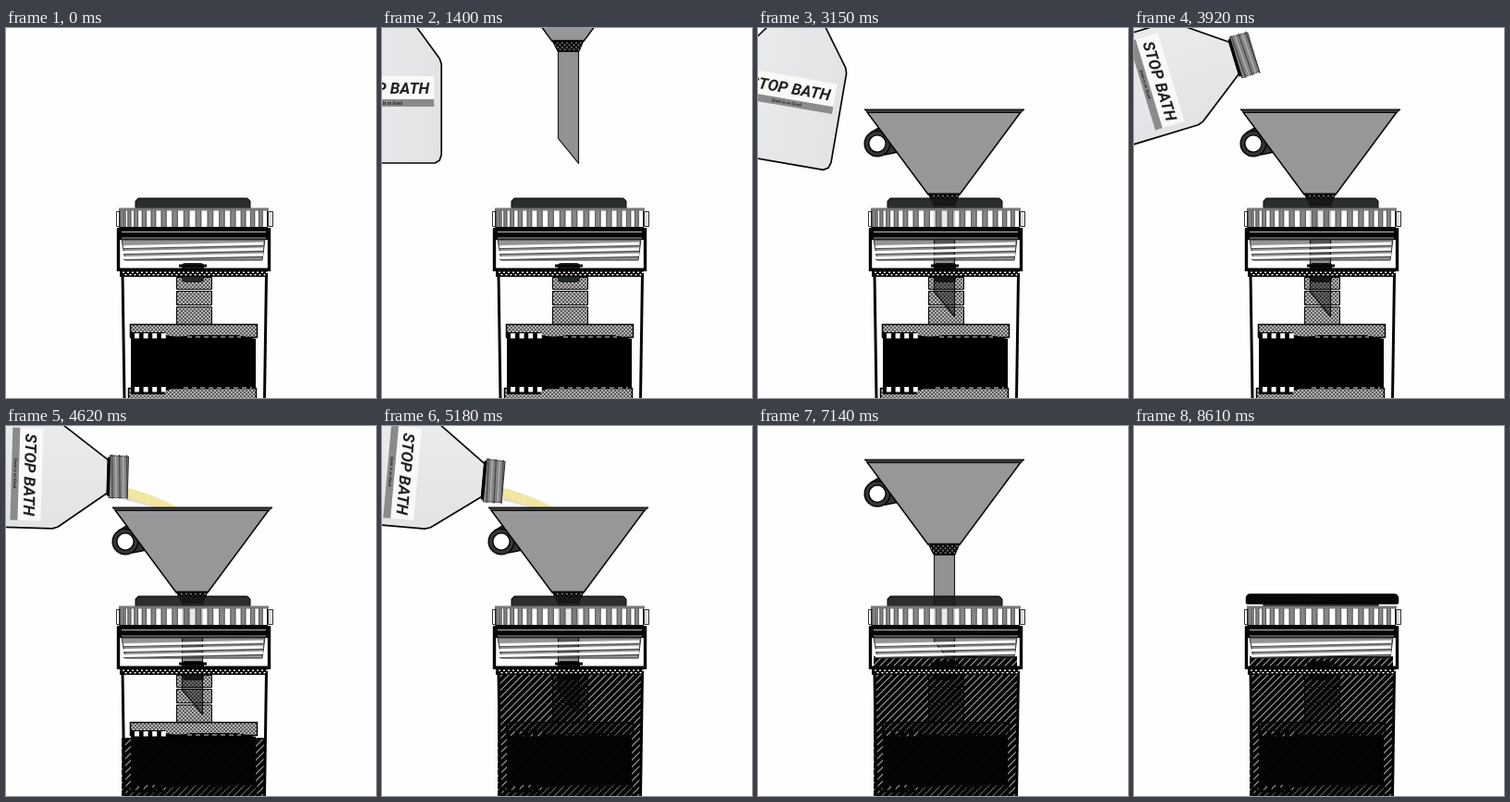
Write an HTML page with a canvas that moves like this. It is 400x400 px and loops after 8680 ms.

```html
<!DOCTYPE html>
<html lang="en">
<head>
<meta charset="utf-8">
<title>Stop bath</title>
<style>
html, body { margin: 0; width: 100%; height: 100%; overflow: hidden; background: #fefefe; }
canvas { display: block; width: 400px; height: 400px; }
</style>
</head>
<body>
<canvas id="stage" width="400" height="400"></canvas>
<script>
const LOOP = 8680, STEP = 70;
const INK = '#050505', PAPER = '#fefefe';
const c = document.getElementById('stage').getContext('2d');

const clamp = v => Math.max(0, Math.min(1, v));
const span = (t, a, b) => clamp((t - a) / (b - a));
const easeOut = p => 1 - (1 - p) ** 2;
const mix = (a, b, p) => a + (b - a) * p;

function rect(x, y, w, h, fill) {
  c.fillStyle = fill;
  c.fillRect(x, y, w, h);
}

function paint(fill, stroke, width = 1.5) {
  if (fill) { c.fillStyle = fill; c.fill(); }
  if (stroke) { c.strokeStyle = stroke; c.lineWidth = width; c.stroke(); }
}

function shape(points, fill, stroke, width) {
  c.beginPath();
  points.forEach(([x, y]) => c.lineTo(x, y));
  c.closePath();
  paint(fill, stroke, width);
}

function disc(x, y, r, fill) {
  c.beginPath();
  c.arc(x, y, r, 0, 7);
  paint(fill, INK);
}

function line(x1, y1, x2, y2, width = 1, color = INK) {
  c.beginPath();
  c.moveTo(x1, y1);
  c.lineTo(x2, y2);
  paint(null, color, width);
}

function box(x, y, w, h, fill, width) {
  c.beginPath();
  c.rect(x, y, w, h);
  paint(fill, INK, width);
}

// Repeating tile with two crossing diagonals.
function crossHatch(size, back, front, width) {
  const tile = document.createElement('canvas');
  tile.width = tile.height = size;
  const g = tile.getContext('2d');
  g.fillStyle = back;
  g.fillRect(0, 0, size, size);
  g.strokeStyle = front;
  g.lineWidth = width;
  g.moveTo(0, 0); g.lineTo(size, size);
  g.moveTo(size, 0); g.lineTo(0, size);
  g.stroke();
  return c.createPattern(tile, 'repeat');
}

const mesh = crossHatch(4, '#b4b4b4', '#444', .8);
const darkMesh = crossHatch(5, '#8d8e8f', INK, 1.8);
const capMesh = crossHatch(8, '#383838', '#050505', 5);

// The lid is partly see-through, so the funnel stem shows behind it.
function drawLid() {
  shape([[140, 195], [140, 187], [143, 184], [261, 184], [264, 187], [264, 195]],
    'rgba(20,24,22,.9)', INK, 1);

  // Grip ribs crowd together towards the edges of the round lid.
  box(122.5, 195.5, 160, 20, 'rgba(254,254,254,.8)', 1);
  for (let k = -9; k <= 8; k++) {
    const a = k * .15, x = 208 + 86 * Math.sin(a), w = 5 * Math.cos(a) + .8;
    if (x > 281) continue;
    rect(x - w / 2, 197, w, 18, 'rgba(0,0,0,.48)');
    line(x - w / 2, 197, x - w / 2, 215, .8, '#333');
    line(x + w / 2, 197, x + w / 2, 215, .8, '#333');
  }
  rect(122, 194.5, 162, 3, '#777');
  box(119.5, 198.5, 3, 16, '#fff', .8);
  box(283.5, 198.5, 5, 16, '#ddd', .8);

  rect(120, 216, 166, 13, INK);
  line(125, 220.5, 281, 220.5, 1, '#bbb');
  line(125, 227, 281, 227, 2, '#555');
  shape([[125, 229], [280, 229], [277, 251], [129, 251]], 'rgba(0,0,0,.42)', '#333', 1);
  for (let y = 236; y < 250; y += 6) {
    line(127, y + 2.5, 278, y - .5, 1, '#444');
    line(127, y + .5, 278, y - 3, 3, '#f8f8f8');
  }
  line(121.5, 217, 121.5, 263, 3.4);
  line(284.5, 217, 284.5, 263, 3.4);
  rect(120, 259.5, 166, 3.5, INK);
  rect(123, 263, 160, 6, INK);
  for (let x = 126; x < 282; x += 5) {
    rect(x, 263.5, 2, 1.5, '#fff');
    rect(x + 2.5, 266, 2, 1.5, '#fff');
  }
}

function drawReel() {
  for (const [y, h] of [[269, 13], [284, 15], [301, 19]])
    box(184.5, y + .5, 38, h, mesh, 1);
  c.beginPath();
  c.roundRect(190, 254, 24, 21, 4);
  paint('#222624');
  line(187, 257, 217, 257, 3);

  box(134.5, 320.5, 137, 14, mesh, 1.5);
  box(132.5, 389.5, 138, 14, mesh, 1.5);
  rect(135, 329, 37, 67, '#000');
  c.beginPath();
  c.moveTo(171, 331);
  c.quadraticCurveTo(182, 336, 200, 332);
  c.lineTo(250, 332);
  c.lineTo(270, 336);
  c.lineTo(270, 389);
  c.lineTo(195, 390);
  c.quadraticCurveTo(180, 387, 171, 394);
  paint('#000');
  for (let x = 139; x < 172; x += 9.6) {
    rect(x, 330, 5, 5.5, PAPER);
    rect(x, 388, 5, 5.5, PAPER);
  }
  c.setLineDash([5, 4]);
  line(196, 334, 254, 334, 1, '#ddd');
  line(192, 389, 266, 389, 1, '#ddd');
  c.setLineDash([]);
}

function drawTank() {
  line(126, 266, 128, 400, 3);
  line(281.5, 266, 279.5, 400, 3);
  drawReel();
}

function drawLiquid(t) {
  if (t < 4410) return;
  const level = mix(400, 249, easeOut(span(t, 4340, 5530)));
  c.save();
  c.beginPath();
  c.rect(125, level, 155, 400 - level);
  c.clip();
  rect(125, level, 155, 400 - level, 'rgba(0,0,0,.35)');
  for (let x = -40; x < 290; x += 7.5) line(x, 405, x + 165, 240, 4.2);
  rect(125, level, 155, 1.5, INK);
  c.restore();
}

function drawFunnel(y) {
  c.save();
  c.translate(0, y);
  c.lineJoin = 'round';
  shape([[122, 24], [134, 17], [152, 45], [137, 48]], '#363636', INK);
  disc(129, 36, 13.8, '#363636');
  disc(129, 36, 9.2, PAPER);

  shape([[118, 2], [284, 2], [218, 91], [184, 91]], '#969799', INK);
  shape([[115, -1], [288, -1], [284, 2.5], [119, 2.5]], '#3a3a3a', INK, 1);

  c.globalCompositeOperation = 'multiply';
  shape([[184, 90], [218, 90], [213, 102], [190, 102]], darkMesh, INK, 1);
  shape([[190.5, 102], [212.5, 102], [212.5, 223], [190.5, 196]], '#929394', '#222', 1.2);
  c.restore();
}

function drawBottle(x, y, degrees) {
  c.save();
  c.translate(x, y);
  c.rotate(degrees * Math.PI / 180);
  c.lineJoin = 'round';
  const glass = c.createLinearGradient(-58, 0, 58, 0);
  glass.addColorStop(0, '#eaebec');
  glass.addColorStop(1, '#e2e3e5');

  shape([[-22, -106], [22, -106], [23, -86], [-23, -86]], '#858585', '#333', 1);
  for (let i = 0; i < 5; i++)
    line(-24, -88 - i * 4, 24, -90 - i * 4, 1.2, i % 2 ? '#b5b5b5' : '#444');
  shape([
    [-18, -84], [18, -84], [56, -32], [58, -26], [58, 72], [56, 78], [51, 81],
    [-51, 81], [-56, 78], [-58, 72], [-58, -26], [-56, -32]
  ], glass, INK, 1.7);
  line(-21, -85, 21, -85, 3);

  rect(-50, -13, 100, 25, '#f9f9f7');
  rect(-50, 12, 100, 8, '#8b8b8b');
  c.fillStyle = '#222';
  c.textAlign = 'right';
  c.font = 'italic bold 17px Roboto, "Open Sans", sans-serif';
  c.fillText('STOP BATH', 45, 6);
  c.textAlign = 'center';
  c.font = 'italic bold 4.5px Roboto, "Open Sans", sans-serif';
  c.fillText('Grain is so Good.', 0, 17.5);
  c.restore();
}

function drawStream(t) {
  const head = mix(128, 196, span(t, 4060, 4340));
  const tail = mix(125, 196, span(t, 5250, 5530));
  if (head <= 128 || tail >= head) return;
  c.save();
  c.beginPath();
  c.rect(tail, 60, head - tail, 28);
  c.clip();
  c.beginPath();
  c.moveTo(124, 65);
  c.quadraticCurveTo(158, 73, 196, 93);
  c.lineTo(176, 93);
  c.quadraticCurveTo(150, 84, 124, 79);
  const flow = c.createLinearGradient(150, 70, 145, 84);
  flow.addColorStop(0, '#cfccbe');
  flow.addColorStop(.3, '#f3e79f');
  flow.addColorStop(.75, '#f1e6a0');
  flow.addColorStop(1, '#dcd9cc');
  paint(flow);
  c.restore();
}

function bottlePose(t) {
  if (t < 980 || t >= 6510) return null;
  const enter = easeOut(span(t, 910, 1820));
  const leave = span(t, 5880, 6510);
  const angle = 11 * easeOut(span(t, 2870, 3290))
    + 79 * easeOut(span(t, 3430, 4340))
    + 5.5 * span(t, 4340, 5250)
    - 99 * leave;
  const tilt = angle / 95.5;
  const slide = -135 * (1 - enter) - 150 * span(leave, .5, 1) ** 2;
  return [mix(35, 25.5, tilt) + slide, mix(65, 51, tilt ** 2), angle];
}

function funnelTop(t) {
  return t < 6860
    ? mix(-303, 89, easeOut(span(t, 910, 2310)))
    : 89 - 350 * span(t, 6790, 7700) ** 2;
}

function drawCap(t) {
  if (t < 8260) return;
  const y = mix(-13, 182, easeOut(span(t, 8190, 8610)));
  c.beginPath();
  c.roundRect(121.5, y, 164, 10, [4, 4, 1, 1]);
  paint(capMesh, INK);
}

function draw(t) {
  rect(0, 0, 400, 400, PAPER);
  drawTank();
  drawStream(t);
  const pose = bottlePose(t);
  if (pose) drawBottle(...pose);
  if (t >= 980 && t < 7700) drawFunnel(funnelTop(t));
  drawLiquid(t);
  drawLid();
  drawCap(t);
}

const start = performance.now();
function tick() {
  const t = (performance.now() - start) % LOOP;
  draw(Math.floor(t / STEP) * STEP);
  requestAnimationFrame(tick);
}
tick();
</script>
</body>
</html>
```
